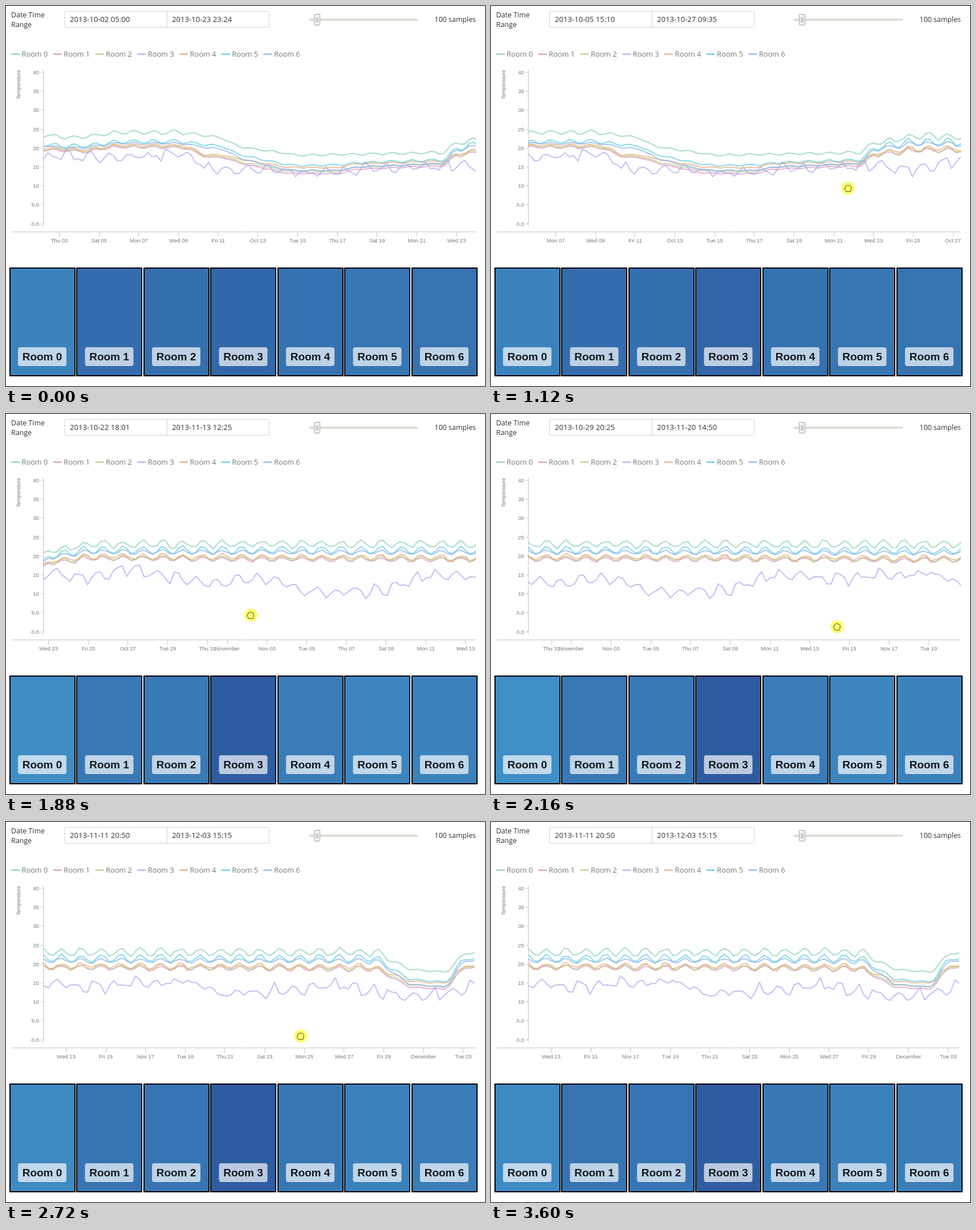
An HTML page with a canvas that plays this animation: 840 by 667 pixels, repeating every 3.88 s.

```html
<!DOCTYPE html>
<html lang="en">
<head>
<meta charset="utf-8">
<title>Room temperatures</title>
<style>
html, body { margin: 0; width: 100%; height: 100%; overflow: hidden; background: #fff; }
canvas { display: block; }
</style>
</head>
<body>
<canvas id="stage" width="840" height="667"></canvas>
<script>
const ctx = document.getElementById('stage').getContext('2d');
const LOOP = 3880, STEP = 40;
const LEFT = 66, RIGHT = 824, ZERO_Y = 382.5, DEGREE = 6.635;

// Days count from the end of September: day 1 is October 1st.
const FIRST_DAY = 2.208449, LAST_DAY = 42.868576, SPAN = 21.767014;
const DAY_WIDTH = (RIGHT - LEFT) / SPAN;
const SAMPLE = SPAN / 99.5, SAMPLES = 286;

const SANS = '"Open Sans", "Noto Sans", sans-serif';
const ARIAL = '"Liberation Sans", Arial, sans-serif';

const clamp = (v, lo, hi) => Math.min(hi, Math.max(lo, v));
const mix = (a, b, p) => a + (b - a) * p;

// Piecewise linear curve through [day, value] points.
const curve = points => day => {
  const i = clamp(points.findIndex(p => p[0] > day), 1, points.length - 1);
  const [d0, v0] = points[i - 1], [d1, v1] = points[i];
  return mix(v0, v1, clamp((day - d0) / (d1 - d0), 0, 1));
};

const warm = curve([[2.2, 23.6], [3.3, 22.9], [4.3, 23], [6, 24.2], [9, 24.3], [11.2, 22.7], [12, 20.5],
  [15, 18.2], [22.4, 18.9], [23, 21.3], [25, 23.2], [59.6, 23.2], [61.3, 18.7], [63.1, 17.9], [63.9, 21.8]]);
const mild = curve([[2.2, 19.6], [4.4, 19.1], [5.7, 20.3], [9.3, 20.2], [10.4, 17.6], [11.2, 17.6],
  [12.3, 15.8], [14.5, 13.4], [17, 13.3], [18, 14.5], [22.4, 15.4], [23, 18.1], [25, 19.4],
  [59.6, 18.8], [61.3, 14], [63.1, 13.4], [64, 18.6]]);
const cold = curve([[2, 17.7], [9.5, 18.4], [10.3, 14.8], [13, 14.6], [16, 13], [19, 14.8], [24, 15.4],
  [25, 14], [27, 17], [31, 12.2], [33.5, 14], [36.5, 10.3], [40, 11], [42, 15.3], [45, 14],
  [50, 15.8], [52, 11.7], [57.5, 14.7], [62, 11.2], [64.6, 14.4]]);

// Strength of the daily rhythm, and how far the heating is off.
const rhythm = curve([[9, 0.5], [12, 0.2], [22, 0.3], [24, 1], [59.6, 1], [61, 0.2], [63, 0.2], [64, 1]]);
const chill = day => clamp((18 - mild(day)) / 4, 0, 1);
const early = day => clamp((10.5 - day) / 1.2, 0, 1);

const ROOMS = [
  { color: '#86cdb3', swing: 0.95, noise: 0.7, level: warm },
  { color: '#da95c3', swing: 0.65, noise: 0.4, level: mild },
  { color: '#b8ce86', swing: 0.65, noise: 0.4, level: d => mild(d) + 0.25 + 0.3 * chill(d) },
  { color: '#aea4ea', swing: 1.3, noise: 2, level: cold, peak: 0.47, rhythm: () => 1 },
  { color: '#e7a876', swing: 0.7, noise: 0.6, level: d => mild(d) + 0.55 + chill(d) },
  { color: '#5cccdb', swing: 1, noise: 0.5,
    level: d => mix(mild(d), warm(d), 0.6) - 0.8 * chill(d) - 0.9 * early(d) },
  { color: '#83b0ea', swing: 0.6, noise: 0.4,
    level: d => mix(mild(d), warm(d), 0.47) - 1.5 * chill(d) - 0.8 * early(d) }];

function noise(i, room) {
  const n = Math.sin(i * 12.9898 + room * 78.233) * 43758.5453;
  return n - Math.floor(n) - 0.5;
}

const series = ROOMS.map((room, index) => Array.from({ length: SAMPLES }, (_, i) => {
  const day = FIRST_DAY + i * SAMPLE;
  const wave = Math.cos((day - (room.peak ?? 0.75)) * 2 * Math.PI);
  const sway = room.swing * wave + room.noise * noise(i, index);
  return { day, value: room.level(day) + (room.rhythm ?? rhythm)(day) * sway };
}));

// Pointer path: time, x, y, pressed from here on.
const POINTER = [
  [560, 775, 633, 0], [880, 639, 324, 0], [920, 639, 324, 0],
  [960, 745.521, 318, 1], [1480, 358, 324, 1], [1520, 345, 326, 0],
  [1680, 743.836, 340, 1], [1880, 429, 353, 1], [1940, 340, 356, 0],
  [2080, 765, 370, 1], [2320, 290.236, 380, 0], [2440, 613, 384, 0],
  [2540, 745, 378, 1], [2860, 339, 374, 0],
  [2980, 744, 364, 1], [3160, 411, 367, 1], [3200, 339, 370, 0],
  [3280, 510, 379, 0], [3600, 823, 665, 0]];

function pointerAt(t) {
  if (t < POINTER[0][0] || t >= POINTER[POINTER.length - 1][0]) return null;
  const i = POINTER.findIndex(key => key[0] > t) - 1;
  const [t0, x0, y0, pressed] = POINTER[i], [t1, x1, y1] = POINTER[i + 1];
  const p = (t - t0) / (t1 - t0);
  return { x: mix(x0, x1, p), y: mix(y0, y1, p), pressed };
}

function viewStart(t) {
  let dragged = 0;
  for (let i = 0; i < POINTER.length - 1; i++) {
    const [t0, x0, , pressed] = POINTER[i], [t1, x1] = POINTER[i + 1];
    if (pressed) dragged += (x0 - x1) * clamp((t - t0) / (t1 - t0), 0, 1);
  }
  return Math.min(LAST_DAY, FIRST_DAY + dragged / DAY_WIDTH);
}

const dateOf = day => new Date(Date.UTC(2013, 8, 30) + day * 864e5);
const stamp = day => dateOf(day).toISOString().slice(0, 16).replace('T', ' ');

function tickLabel(date) {
  const name = options => date.toLocaleString('en-US', { ...options, timeZone: 'UTC' });
  const number = date.getUTCDate();
  if (number === 1) return name({ month: 'long' });
  const head = date.getUTCDay() ? name({ weekday: 'short' }) : name({ month: 'short' });
  return head + ' ' + String(number).padStart(2, '0');
}

function text(str, x, y, font, color, align = 'left') {
  ctx.font = font;
  ctx.fillStyle = color;
  ctx.textAlign = align;
  ctx.fillText(str, x, y);
}

function line(x0, y0, x1, y1, color) {
  ctx.strokeStyle = color;
  ctx.lineWidth = 1;
  ctx.beginPath();
  ctx.moveTo(x0, y0);
  ctx.lineTo(x1, y1);
  ctx.stroke();
}

function box(x, y, w, h, radius, fill, stroke) {
  ctx.beginPath();
  ctx.roundRect(x, y, w, h, radius);
  ctx.fillStyle = fill;
  ctx.fill();
  if (!stroke) return;
  ctx.strokeStyle = stroke;
  ctx.lineWidth = 1;
  ctx.stroke();
}

function drawHeader(start) {
  const font = '12.4px ' + SANS, inputFont = '13.1px ' + SANS, ink = '#333';
  text('Date Time', 9, 20, font, ink);
  text('Range', 9, 37, font, ink);
  box(102.5, 9.5, 180, 28, [3, 0, 0, 3], '#fff', '#d2d2d2');
  box(282.5, 9.5, 179, 28, [0, 3, 3, 0], '#fff', '#d2d2d2');
  text(stamp(start), 112, 28, inputFont, ink);
  text(stamp(start + SPAN), 291, 28, inputFont, ink);
  box(532, 22, 190, 4, 1, '#dfdcd6');
  box(540.5, 14.5, 10, 19, 1, '#f0f0ee', '#a5a5a3');
  for (let y = 21.5; y < 28; y += 3) line(543, y, 548, y, '#888');
  text('100 samples', 824, 28, font, ink, 'right');
}

function drawLegend() {
  ROOMS.forEach(({ color }, index) => {
    const x = 9 + index * 73.75;
    ctx.globalAlpha = 0.7;
    ctx.fillStyle = color;
    ctx.fillRect(x, 83, 15, 3);
    ctx.globalAlpha = 1;
    text('Room ' + index, x + 18.5, 89, '12.8px ' + SANS, '#777');
  });
}

function drawAxes(start) {
  const gray = '#c8c8c4', ink = '#777', font = '9.5px ' + ARIAL;
  line(65.5, 112, 65.5, 387, gray);
  line(9, 396.5, RIGHT, 396.5, gray);
  for (let value = 0; value <= 40; value += 5) {
    const y = Math.round(ZERO_Y - value * DEGREE);
    line(61, y - 0.5, 66, y - 0.5, gray);
    text(value < 10 ? value.toFixed(1) : value, 58, y + 3, font, ink, 'right');
  }
  ctx.save();
  ctx.translate(24.5, 138);
  ctx.rotate(-Math.PI / 2);
  text('Temperature', 0, 0, '9.2px ' + ARIAL, ink, 'center');
  ctx.restore();

  for (let day = Math.ceil(start); day <= start + SPAN; day++) {
    const date = dateOf(day);
    if (date.getUTCDate() % 2 === 0) continue;
    const x = LEFT + (day - start) * DAY_WIDTH, label = tickLabel(date);
    const tick = Math.floor(x) + 0.5;
    line(tick, 397, tick, 405, gray);
    ctx.font = font;
    if (x + ctx.measureText(label).width / 2 <= RIGHT + 1) text(label, x, 415, font, ink, 'center');
  }
}

function drawSeries(start) {
  ctx.save();
  ctx.beginPath();
  ctx.rect(65, 110, RIGHT - 65, 280);
  ctx.clip();
  ctx.globalAlpha = 0.7;
  ctx.lineWidth = 2;
  ctx.lineJoin = 'round';
  series.forEach((points, index) => {
    ctx.strokeStyle = ROOMS[index].color;
    ctx.beginPath();
    for (const { day, value } of points)
      ctx.lineTo(LEFT + (day - start) * DAY_WIDTH, ZERO_Y - value * DEGREE);
    ctx.stroke();
  });
  ctx.restore();
}

function drawCards(start) {
  series.forEach((points, index) => {
    const seen = points.filter(p => p.day >= start && p.day <= start + SPAN);
    const rise = seen.reduce((sum, p) => sum + p.value, 0) / seen.length - 13.5;
    const left = 6 + index * 117.5, x = Math.floor(left);
    ctx.fillStyle = `rgb(${45 + 1.9 * rise}, ${92 + 5.1 * rise}, ${160 + 3.8 * rise})`;
    ctx.fillRect(x, 459, 116, 191);
    ctx.strokeStyle = '#000';
    ctx.lineWidth = 2;
    ctx.strokeRect(x + 1, 460, 114, 189);
    box(left + 15, 599, 85, 33, 4, 'rgba(255,255,255,0.68)');
    text('Room ' + index, left + 57.5, 622, 'bold 19px ' + ARIAL, '#111820', 'center');
  });
}

const ARROW = new Path2D('M.5 .5V16L4.2 12.6L6.8 18.5L9.2 17.4L6.7 11.6H11.4Z');
const HAND = new Path2D('M-3.5 6L-6 1.2Q-6.6-1.4-4.5-1V-3Q-4.3-5-2.5-4.5Q-1.2-6.4.5-5Q2.5-6 3.3-4Q5.6-4 5.6-1.5Q5.6 3 4 6Z');

function drawPointer({ x, y, pressed }) {
  ctx.save();
  ctx.translate(x, y);
  ctx.lineWidth = 1;
  if (pressed) {
    ctx.fillStyle = '#ffff70';
    ctx.strokeStyle = '#4a4820';
    ctx.beginPath();
    ctx.arc(0, 0, 11.5, 0, Math.PI * 2);
    ctx.fill();
    ctx.stroke(HAND);
  } else {
    ctx.fillStyle = '#fff';
    ctx.strokeStyle = '#111';
    ctx.fill(ARROW);
    ctx.stroke(ARROW);
  }
  ctx.restore();
}

function draw(t) {
  const start = viewStart(t), pointer = pointerAt(t);
  ctx.fillStyle = '#fff';
  ctx.fillRect(0, 0, 840, 667);
  drawHeader(start);
  drawLegend();
  drawAxes(start);
  drawSeries(start);
  drawCards(start);
  if (pointer) drawPointer(pointer);
}

const begin = performance.now();
function tick() {
  const t = (performance.now() - begin) % LOOP;
  draw(Math.floor(t / STEP) * STEP);
  requestAnimationFrame(tick);
}
tick();
</script>
</body>
</html>
```
